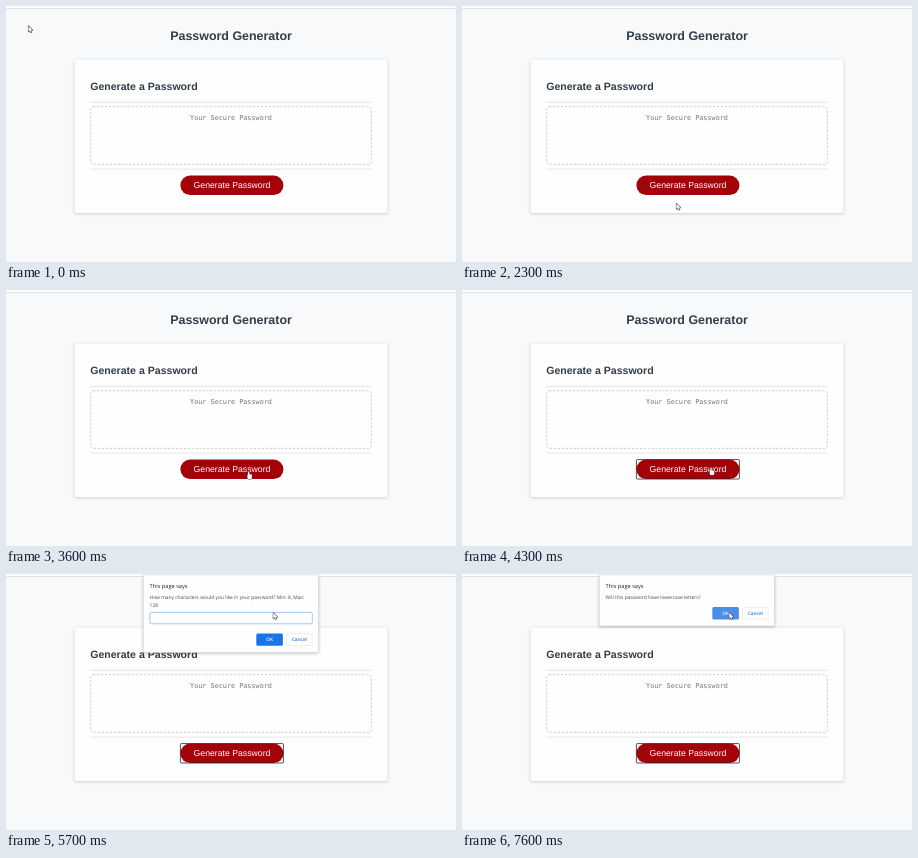
An HTML page with a canvas that plays this animation: 450 px wide and 256 px high, repeating every 8000 ms.

```html
<!DOCTYPE html>
<html lang="en">
<head>
<meta charset="utf-8">
<title>Password Generator</title>
<style>
html, body { margin: 0; width: 100%; height: 100%; overflow: hidden; background: #f7f9fb; }
canvas { display: block; width: 450px; height: 256px; }
</style>
</head>
<body>
<canvas id="stage" width="450" height="256"></canvas>
<script>
const ctx = document.getElementById('stage').getContext('2d');
const LOOP = 8000, STEP = 100;
const FOCUS = 4300, PROMPT = 4400, TYPED = 6500, CONFIRM = 7000, BLINK = 500;
const SANS = '"Liberation Sans", Arial, sans-serif';
const MONO = '"DejaVu Sans Mono", monospace';
const UI = '"Open Sans", sans-serif';
const INK = '#333e48', BLUE = '#1a73e8';
const BUTTON = { x: 174.4, y: 169.6, w: 103, h: 19.4 };

// Each pointer stroke is one cubic curve; it begins where the last one ended
const home = [22.5, 20];
const strokes = [
  { start: 0, time: 800, curve: [[280, 150], [622, 316], [344, 204]] },
  { start: 1500, time: 300, curve: [[290, 205], [230, 185], [193, 177]] },
  { start: 2000, time: 900, curve: [[180, 208], [310, 208], [226, 173]] },
  { start: 2900, time: 800, curve: [[263, 157], [225, 194], [249, 177.3]] },
  { start: 4600, time: 900, curve: [[265, 124], [278, 40], [267.3, 38.8]] }
];

function bezier(a, b, c, d, u) {
  const v = 1 - u;
  return v * v * v * a + 3 * v * v * u * b + 3 * v * u * u * c + u * u * u * d;
}

function pointerAt(t) {
  let pos = home;
  for (const { start, time, curve: [b, c, d] } of strokes) {
    if (t < start) break;
    const u = Math.min(1, (t - start) / time);
    pos = pos.map((a, i) => bezier(a, b[i], c[i], d[i], u));
  }
  return pos;
}

function text(str, x, y, font, color, align = 'left') {
  ctx.font = font;
  ctx.fillStyle = color;
  ctx.textAlign = align;
  ctx.fillText(str, x, y);
}

function box(x, y, w, h, r, fill, stroke, line = 0.8) {
  ctx.beginPath();
  ctx.roundRect(x, y, w, h, r);
  if (fill) { ctx.fillStyle = fill; ctx.fill(); }
  if (stroke) { ctx.strokeStyle = stroke; ctx.lineWidth = line; ctx.stroke(); }
}

function panel(x, y, w, h, r, blur, alpha) {
  ctx.save();
  ctx.shadowColor = `rgba(0,0,0,${alpha})`;
  ctx.shadowBlur = blur;
  ctx.shadowOffsetY = 0.8;
  box(x, y, w, h, r, '#fefefe');
  ctx.restore();
}

function bar(x, y, w, h, color) {
  ctx.fillStyle = color;
  ctx.fillRect(x, y, w, h);
}

function drawPage(focused) {
  bar(0, 0, 450, 256, '#f7f9fb');
  bar(0, 0, 450, 2, '#fdfdfe');
  bar(0, 2, 450, 1, '#dfe1e3');

  text('Password Generator', 225, 34.2, `bold 12.45px ${SANS}`, INK, 'center');
  panel(68.5, 53.7, 313, 153.3, 2, 3.5, 0.2);
  text('Generate a Password', 84.2, 84.2, `bold 10.57px ${SANS}`, INK);
  for (const y of [95.8, 162.6]) bar(84.3, y, 281.4, 0.9, '#e1e3e5');

  ctx.setLineDash([2.3, 1.6]);
  box(84.7, 100.7, 280.6, 57.7, 2.5, null, '#bdc1c4');
  ctx.setLineDash([]);
  text('Your Secure Password', 225, 114.2, `6.8px ${MONO}`, '#757575', 'center');

  const { x, y, w, h } = BUTTON;
  box(x, y, w, h, h / 2, '#a40209');
  text('Generate Password', 226, 182.4, `8.7px ${SANS}`, '#fff', 'center');
  if (focused) box(x, y, w, h, 0.8, null, '#222', 0.8);
}

function drawDialog(h, lines, okColor) {
  panel(137.3, 0.8, 175.2, h, 1.5, 3.5, 0.28);
  box(137.3, 0.8, 175.2, h, 1.5, null, '#cdcfd2', 0.5);
  text('This page says', 143.6, 13.8, `5.67px ${UI}`, '#202124');
  lines.forEach((s, i) => text(s, 143.6, 25.2 + i * 7.9, `4.9px ${UI}`, '#45484c'));
  const y = h - 18.2;
  box(250.3, y, 26.6, 12.4, 1.5, okColor);
  box(280.6, y + 0.3, 25.6, 11.8, 1.5, '#fff', '#dadce0', 0.5);
  text('OK', 263.6, y + 8, `600 4.7px ${UI}`, '#fff', 'center');
  text('Cancel', 293.4, y + 8, `600 4.7px ${UI}`, BLUE, 'center');
}

function drawPrompt(t) {
  drawDialog(77.6, ['How many characters would you like in your password? Min: 8, Max:', '128'], BLUE);
  box(143.9, 38.4, 162.4, 11.4, 1.2, '#fff', '#9cc0f3', 0.9);
  const typed = t >= TYPED;
  if (typed) text('12', 146.4, 45.9, `4.9px ${UI}`, '#202124');
  if (typed || Math.floor(t / BLINK) % 2 === 0) bar(typed ? 151.8 : 146.5, 41.2, 0.6, 5.8, '#444');
}

function outlined(shape) {
  ctx.lineJoin = 'round';
  ctx.lineWidth = 1.1;
  ctx.strokeStyle = '#444';
  ctx.stroke(shape);
  ctx.fillStyle = '#fff';
  ctx.fill(shape);
}

function drawArrow() {
  outlined(new Path2D('M0 0 V5.6 L1.4 4.5 L2.3 6.5 L3.1 6.1 L2.3 4.2 H4 Z'));
}

function drawHand() {
  const hand = new Path2D();
  hand.roundRect(-0.6, 0.3, 1.2, 5, 0.6);
  hand.roundRect(-1.2, 3.1, 4.4, 4.6, 1.2);
  outlined(hand);
}

function drawPointer(t) {
  const [x, y] = pointerAt(t);
  const { x: left, y: top, w, h } = BUTTON;
  const overButton = x > left && x < left + w && y > top - 0.5 && y < top + h;
  const held = t >= PROMPT && y > 78;
  ctx.save();
  ctx.translate(x, y);
  if (overButton || held) drawHand();
  else drawArrow();
  ctx.restore();
}

function render(now) {
  const t = Math.floor((now % LOOP) / STEP) * STEP;
  ctx.textRendering = 'geometricPrecision';
  drawPage(t >= FOCUS);
  if (t >= CONFIRM) drawDialog(51.3, ['Will this password have lowercase letters?'], '#4b8dea');
  else if (t >= PROMPT) drawPrompt(t);
  drawPointer(t);
}

const origin = performance.now();
function tick() {
  render(performance.now() - origin);
  requestAnimationFrame(tick);
}
tick();
</script>
</body>
</html>
```
